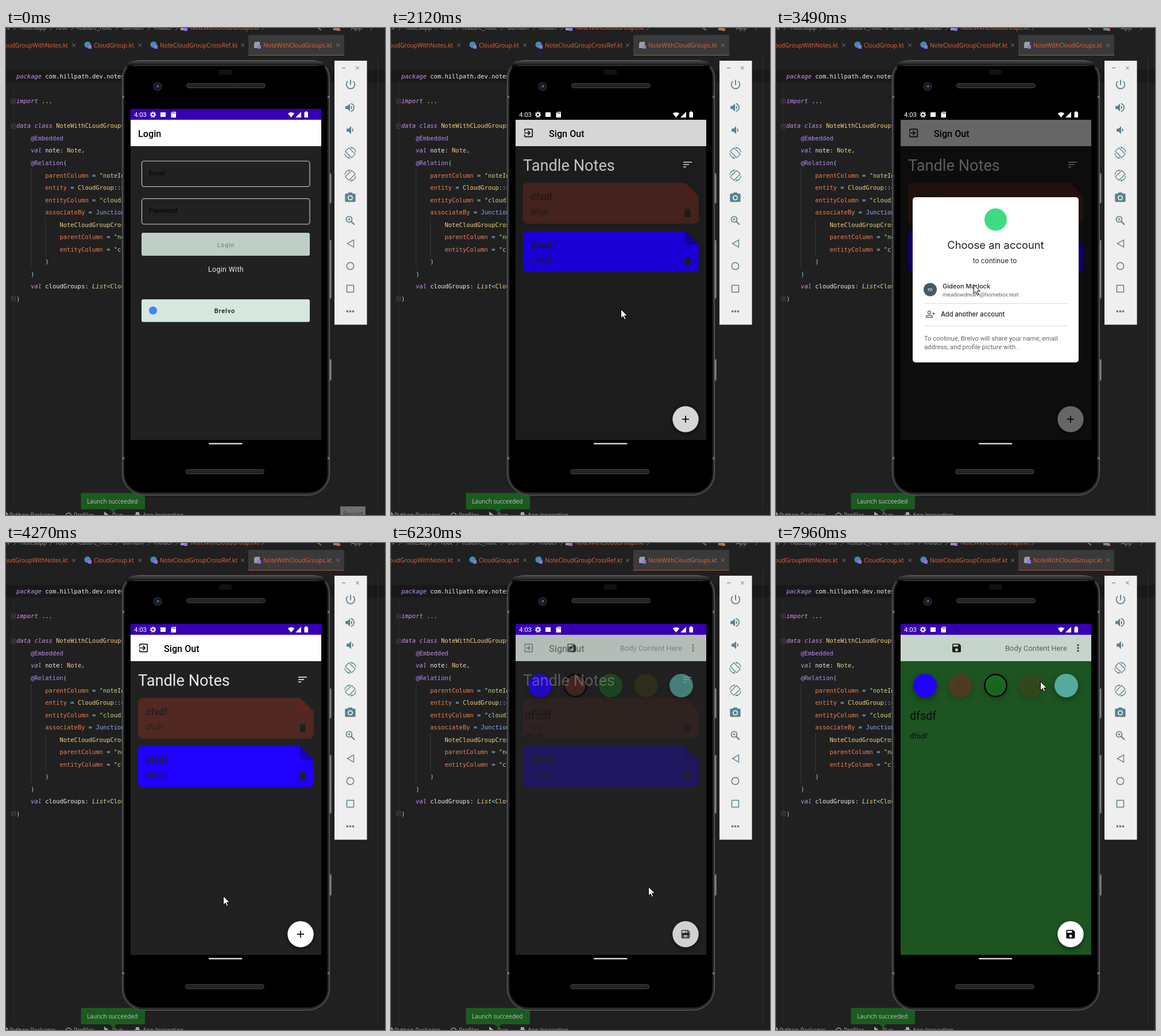
An HTML page with a canvas that plays this animation: 660x849 px, repeating every 8000 ms.

```html
<!DOCTYPE html>
<html lang="en">
<head>
<meta charset="utf-8">
<title>Notes app demo</title>
<style>
html, body { margin: 0; width: 100%; height: 100%; overflow: hidden; background: #202020; }
canvas { display: block; width: 660px; height: 849px; }
</style>
</head>
<body>
<canvas id="stage" width="660" height="849"></canvas>
<script>
const LOOP = 8000, W = 660, H = 849;
const main = document.getElementById('stage').getContext('2d');
const layerCanvas = document.createElement('canvas');
layerCanvas.width = W;
layerCanvas.height = H;
const layer = layerCanvas.getContext('2d');
let g = main;

const UI = '10.25px "Open Sans", sans-serif';
const MONO = '10.45px "DejaVu Sans Mono", monospace';
const roboto = (size, weight = 400) => `${weight} ${size}px Roboto, sans-serif`;
const inter = (size, weight = 400) => `${weight} ${size}px Inter, sans-serif`;
const BG = '#212121', INK = '#202020', TEAL = '#5a8192';
const SCREEN = [217, 141, 332, 577];

const ICON = {
  save: 'M17 3H5a2 2 0 0 0-2 2v14a2 2 0 0 0 2 2h14a2 2 0 0 0 2-2V7zM12 19a3 3 0 1 1 0-6 3 3 0 0 1 0 6zM15 9H5V5h10z',
  trash: 'M6 19a2 2 0 0 0 2 2h8a2 2 0 0 0 2-2V7H6zM19 4h-3.5l-1-1h-5l-1 1H5v2h14z',
  exit: 'M10 15.6L11.5 17l5-5-5-5L10 8.4 12.7 11H3v2h9.7zM19 3H5a2 2 0 0 0-2 2v4h2V5h14v14H5v-4H3v4a2 2 0 0 0 2 2h14a2 2 0 0 0 2-2V5a2 2 0 0 0-2-2z',
  camera: 'M9 2L7.2 4H4a2 2 0 0 0-2 2v12a2 2 0 0 0 2 2h16a2 2 0 0 0 2-2V6a2 2 0 0 0-2-2h-3.2L15 2zM12 17a5 5 0 1 1 0-10 5 5 0 0 1 0 10zM12 15a3 3 0 1 0 0-6 3 3 0 0 0 0 6z',
  sound: 'M3 9v6h4l5 5V4L7 9zM16.5 12A4.5 4.5 0 0 0 14 8v8a4.5 4.5 0 0 0 2.5-4z',
  wave: 'M14 3.2v2.1a7 7 0 0 1 0 13.4v2.1a9 9 0 0 0 0-17.6z',
  power: 'M13 3h-2v10h2zM17.8 5.2l-1.4 1.4a7 7 0 1 1-8.8 0L6.2 5.2a9 9 0 1 0 11.6 0z',
  turn: 'M16.5 2.5A10.5 10.5 0 0 1 22.5 11H24A12 12 0 0 0 11.3 0l3.8 3.8zM10.2 1.7a1.5 1.5 0 0 0-2.1 0L1.7 8.1a1.5 1.5 0 0 0 0 2.1l12 12a1.5 1.5 0 0 0 2.1 0l6.4-6.4a1.5 1.5 0 0 0 0-2.1zM14.8 21.2l-12-12 6.4-6.4 12 12zM7.5 21.5A10.5 10.5 0 0 1 1.5 13H0A12 12 0 0 0 12.7 24l-3.8-3.8z',
  arrow: 'M0.5 0.5V16L4.1 12.6 6.6 18.3 9 17.2 6.5 11.7H11.5z'
};
for (const k in ICON) ICON[k] = new Path2D(ICON[k]);

const clamp = v => Math.max(0, Math.min(1, v));
const span = (t, a, b) => clamp((t - a) / (b - a));
const smooth = u => u * u * (3 - 2 * u);

// cubic-bezier(.4, 0, .2, 1)
function ease(x) {
  let lo = 0, hi = 1, s = x;
  for (let i = 0; i < 24; i++) {
    s = (lo + hi) / 2;
    const at = 1.2 * s * (1 - s) ** 2 + 0.6 * s * s * (1 - s) + s ** 3;
    if (at < x) lo = s; else hi = s;
  }
  return 3 * s * s * (1 - s) + s ** 3;
}

function text(s, x, y, font, color, align = 'left', spacing = 0) {
  g.font = font;
  g.fillStyle = color;
  g.textAlign = align;
  g.letterSpacing = spacing + 'px';
  g.fillText(s, x, y);
}
function rect(x, y, w, h, color, r = 0) {
  g.fillStyle = color;
  g.beginPath();
  g.roundRect(x, y, w, h, r);
  g.fill();
}
function frame(x, y, w, h, color, r = 0, lw = 1) {
  g.strokeStyle = color;
  g.lineWidth = lw;
  g.beginPath();
  g.roundRect(x, y, w, h, r);
  g.stroke();
}
function disc(x, y, r, color) {
  g.fillStyle = color;
  g.beginPath();
  g.arc(x, y, r, 0, 7);
  g.fill();
}
function ring(x, y, r, color, lw) {
  g.strokeStyle = color;
  g.lineWidth = lw;
  g.beginPath();
  g.arc(x, y, r, 0, 7);
  g.stroke();
}
function poly(points, color, lw = 0, close = false) {
  g.beginPath();
  for (let i = 0; i < points.length; i += 2) g.lineTo(points[i], points[i + 1]);
  if (close || !lw) g.closePath();
  if (lw) {
    g.strokeStyle = color;
    g.lineWidth = lw;
    g.stroke();
  } else {
    g.fillStyle = color;
    g.fill();
  }
}
function icon(path, cx, cy, size, color, flip = 1) {
  g.save();
  g.translate(cx, cy);
  g.scale(flip * size / 24, size / 24);
  g.translate(-12, -12);
  g.fillStyle = color;
  g.fill(path, 'evenodd');
  g.restore();
}
function cross(x, y, r, color, lw = 1) {
  poly([x - r, y - r, x + r, y + r], color, lw);
  poly([x - r, y + r, x + r, y - r], color, lw);
}
function shadow(blur, dy, alpha) {
  g.shadowColor = `rgba(0,0,0,${alpha})`;
  g.shadowBlur = blur;
  g.shadowOffsetY = dy;
}

// Code colours: k keyword, a annotation, w plain, y type, o argument, s string, b call, c operator
const HUES = { k: '#c792ea', a: '#b58cf2', w: '#e8f0f0', y: '#f0cf84', o: '#ec8054', s: '#bddc8a', b: '#8fa6f4', c: '#89ddff' };
const CODE = [
  [0, 'k:package', 'w: com.hillpath.dev.notes'], [],
  [0, 'k:import', 'y: ...'], [],
  [0, 'k:data class', 'y: NoteWithCLoudGroups('],
  [4, 'a:@Embedded'],
  [4, 'k:val', 'w: note', 'c:: ', 'y:Note', 'c:,'],
  [4, 'a:@Relation', 'c:('],
  [8, 'o:parentColumn ', 'c:= ', 's:"noteId"'],
  [8, 'o:entity ', 'c:= ', 'y:CloudGroup', 'c:::class'],
  [8, 'o:entityColumn ', 'c:= ', 's:"cloudId"'],
  [8, 'o:associateBy ', 'c:= ', 'b:Junction('],
  [12, 'y:NoteCloudGroupCrossRef'],
  [12, 'o:parentColumn ', 'c:= ', 's:"noteId"'],
  [12, 'o:entityColumn ', 'c:= ', 's:"cloudId"'],
  [8, 'c:)'], [4, 'c:)'],
  [4, 'k:val', 'w: cloudGroups', 'c:: ', 'i:List', 'c:<', 'y:CloudGroup'],
  [0, 'c:)']
];

function code() {
  rect(0, 73, W, 22, '#191919');
  rect(647, 48, 1, 790, '#303030');
  rect(13, 95, 1, 742, '#2b2b2b');
  rect(43, 246, 1, 172, '#373737');
  rect(68, 332, 1, 66, '#373737');
  CODE.forEach((line, row) => {
    let col = line[0];
    for (const part of line.slice(1)) {
      const kind = part[0], s = part.slice(2), it = kind === 'k' || kind === 'i';
      text(s, 18 + col * 6.29, 88.3 + row * 21.53, (it ? 'italic ' : '') + MONO, HUES[kind] || HUES.y);
      col += s.length;
    }
  });
  for (const y of [127.5, 171, 472]) {
    rect(9, y - 4, 8, 8, BG);
    frame(9.5, y - 3.5, 7, 7, '#484848');
    rect(11, y - 0.5, 4, 1, '#666');
  }
}

function ktIcon(x, y, file) {
  if (file) poly([x - 4, y - 6, x + 4, y - 6, x + 4, y + 5, x - 6, y + 5, x - 6, y - 3], '#93a0a8');
  else disc(x - 1, y - 1, 5.6, '#3f8db0');
  rect(x, y, 6, 6, '#a06be8');
}

function editorTop() {
  const grey = '#9a9a9a', orange = '#e0663f';
  [['ev', -4], ['notesapp', 26], ['root', 87], ['feature_note', 124], ['domain', 203], ['model', 258], ['App', 601]]
    .forEach(([s, x]) => text(s, x, 3, UI, grey));
  text('NoteWithCloudGroups.kt', 321, 3, UI, orange);
  for (const x of [15, 78, 115, 193, 249, 297, 447, 636]) poly([x - 2, -4, x + 2, 0, x - 2, 4], '#777', 1);
  ktIcon(310, -1, true);
  poly([541, -2, 549, 4], '#777', 2);
  rect(570, -4, 10, 8, '#678b9c');
  rect(576, 1, 6, 4, '#d96536');

  rect(422, 12, 167, 36, '#3a3a3a');
  rect(422, 47, 167, 1, '#b4573a');
  [['CloudGroupWithNotes.kt', -12, 118], ['CloudGroup.kt', 153, 233], ['NoteCloudGroupCrossRef.kt', 268, 412], ['NoteWithCloudGroups.kt', 448, 578]]
    .forEach(([s, x, close], i) => {
      text(s, x, 34, UI, orange);
      cross(close, 30, 3, '#7b7b7b');
      if (i) ktIcon(x - 10, 30, i === 3);
    });
}

function editorBottom(t) {
  const c = '#a3a3a3';
  disc(-1, 849, 5, '#7d8b93');
  [['Python Packages', 6], ['Profiler', 118], ['Run', 185], ['App Inspection', 238]]
    .forEach(([s, x]) => text(s, x, 852.5, UI, c));
  ring(109, 850, 4.5, c, 1.5);
  poly([171, 843, 179, 849, 171, 855], c);
  rect(226, 844, 6, 4, c);
  rect(224, 848, 10, 3, c);
  poly([179, 838, 193, 838, 187, 845], '#1c5b20');
  rect(130.5, 810.5, 111.5, 28.5, '#1c5b20', 2);
  text('Launch succeeded', 141, 828.5, UI, '#b9c5b8');
  if (t < 70) {
    rect(582, 834, 44, 16, '#707070');
    text('Record', 587, 850.5, '10.6px "Open Sans", sans-serif', '#343434');
  }
}

function phone() {
  for (const [y, h] of [[253, 53], [369, 103], [577, 38]]) {
    rect(561, y, 6, h, '#5e6060', 2);
    rect(564, y + 2, 1.5, h - 4, '#8a8c8c');
  }
  rect(202, 56, 362, 759, '#2b2d2d', [30, 30, 38, 38]);
  frame(202.5, 56.5, 361, 758, '#66696a', [30, 30, 38, 38]);
  rect(206, 60, 354, 750, '#000', [26, 26, 33, 33]);
  for (const y of [118, 748]) {
    rect(202, y, 4, 4, '#696c6c');
    rect(560, y, 4, 4, '#696c6c');
  }
  const gloss = g.createLinearGradient(0, 57, 0, 68);
  gloss.addColorStop(0, '#4a4d4c');
  gloss.addColorStop(0.7, '#161818');
  gloss.addColorStop(1, '#000');
  rect(210, 57.5, 346, 11, gloss, [24, 24, 0, 0]);
  poly([222, 65.5, 544, 65.5], '#39423e', 1);
  rect(370, 72, 24, 9.5, '#111214', 5);
  for (const [x, y] of [[314, 96], [312, 769]]) {
    rect(x, y, 138, 9, '#333', 4.5);
    rect(x + 2, y + 2, 134, 5, '#1b1b1b', 2.5);
    for (let i = 5; i < 134; i += 3) rect(x + i, y + 3, 1, 3, '#3b3b3b');
  }
  disc(264, 102, 7.8, '#23272b');
  disc(264, 102, 5.5, '#12161c');
  disc(264, 102, 3, '#27365d');
  disc(265, 101, 1.2, '#6c83b8');
  rect(353, 723.5, 58.5, 2.2, '#ededed', 1);
}

function statusBar(color) {
  rect(217, 141, 332, 19, color);
  text('4:03', 223, 155, roboto(11.4), '#fff');
  g.setLineDash([1.9, 1.9]);
  ring(256, 151, 4.4, '#fff', 1.8);
  g.setLineDash([]);
  ring(256, 151, 2.8, '#fff', 1.9);
  rect(269, 147, 9, 8, '#fff');
  poly([290, 146, 296, 146, 296, 156, 287.5, 156, 287.5, 148.5], '#fff');
  for (let i = 0; i < 3; i++) rect(290 + i * 1.9, 147, 0.9, 2.4, color);
  g.beginPath();
  g.moveTo(496.5, 156);
  g.arc(496.5, 156, 9, -2.27, -0.87);
  g.fillStyle = '#fff';
  g.fill();
  poly([504, 156, 514, 146, 514, 156], '#fff');
  rect(519.5, 146.5, 6.5, 9.5, '#fff', 1);
  rect(521.3, 145.4, 3, 2, '#fff');
}

function toolbar(color) {
  rect(217, 160, 332, 46, color);
}

function loginScreen() {
  toolbar('#fff');
  text('Login', 230, 189.5, roboto(16.2, 500), '#000');
  [['Email', 232], ['Password', 297.5]].forEach(([s, y]) => {
    frame(236.5, y, 292.5, 44.5, '#d6d6d6', 4, 1.1);
    text(s, 249, y + 24.5, roboto(11.2), '#000');
  });
  rect(236, 357, 293, 40, '#bfcfc6', 3);
  text('Login', 383, 381.5, roboto(10.5, 500), '#7c8781', 'center', 0.9);
  text('Login With', 383, 425, roboto(12.4), '#ededed', 'center', 0.35);
  rect(236, 473, 293, 39.5, '#d6e7dd', 3);
  text('Brelvo', 381, 497, roboto(11, 500), '#111', 'center', 0.9);
  disc(256, 492.5, 7, '#4285f4');
}

function note(y, color, fold, body) {
  const left = 229.8, right = 535.8, bottom = y + 71.2, cut = 24;
  g.beginPath();
  g.moveTo(right - cut, y);
  g.lineTo(right, y + cut);
  g.arcTo(right, bottom, left, bottom, 8);
  g.arcTo(left, bottom, left, y, 8);
  g.arcTo(left, y, right, y, 8);
  g.closePath();
  g.fillStyle = color;
  g.fill();
  g.beginPath();
  g.moveTo(right - cut, y);
  g.lineTo(right, y + cut);
  g.arcTo(right - cut, y + cut, right - cut, y, 8);
  g.closePath();
  g.fillStyle = fold;
  g.fill();
  text('dfsdf', 243, y + 30, roboto(16.2, 500), INK);
  text(body, 243, y + 55, roboto(12.9), INK);
  icon(ICON.trash, 516.5, y + 52.5, 19.5, INK);
}

function fab() {
  g.save();
  shadow(7, 3, 0.5);
  disc(513, 682, 22.7, '#fff');
  g.restore();
}

function notesScreen() {
  toolbar('#fff');
  icon(ICON.exit, 239.5, 183, 20, '#111');
  text('Sign Out', 275, 189.5, roboto(16.2, 500), '#000');
  text('Tandle Notes', 230, 248.5, roboto(27.2), '#e8e8e8');
  [15, 10, 5].forEach((w, i) => rect(509, 233 + i * 4.2, w, 1.7, '#e8e8e8'));
  note(270, '#512822', '#5f241b', 'dfsdf');
  note(354, '#2000ff', '#1a00b8', 'sdfsdf');
  fab();
  rect(507, 681.1, 12, 1.7, '#000');
  rect(512.1, 676, 1.7, 12, '#000');
}

const SWATCH = ['rgb(32,0,255)', 'rgba(128,48,36,.5)', 'rgba(26,136,36,.5)', 'rgba(76,72,24,.5)', 'rgba(101,199,191,.8)'];

function editScreen(t) {
  const picked = t < 7030 ? 1 : 2;
  const tint = ease(span(t, 7030, 7530));
  if (tint) {
    g.globalAlpha = tint;
    rect(217, 206, 332, 512, '#1d5422');
    g.globalAlpha = 1;
  }
  toolbar('#c6d5cc');
  icon(ICON.save, 314.5, 183, 20, '#1c1f1d');
  text('Body Content Here', 399, 188, roboto(12.93), '#59615d');
  for (const y of [178, 183, 188]) disc(526, y, 1.7, '#3f4542');
  SWATCH.forEach((c, i) => {
    const x = 259.5 + i * 61.5;
    g.save();
    shadow(12, 4, 0.4);
    disc(x, 248.5, 20.5, c);
    g.restore();
    if (i === picked) ring(x, 248.5, 19.2, '#000', 2.5);
  });
  text('dfsdf', 233, 308, roboto(19.7), '#0b0b0b');
  text('dfsdf', 233, 340.5, roboto(13.2), '#0b0b0b');
  fab();
  icon(ICON.save, 513, 682, 20, '#000');
}

// Draws a whole screen as one translucent group
function group(alpha, draw) {
  if (alpha <= 0) return;
  layer.clearRect(0, 0, W, H);
  g = layer;
  draw();
  g = main;
  g.globalAlpha = alpha;
  g.drawImage(layerCanvas, 0, 0);
  g.globalAlpha = 1;
}

function dialog() {
  const dark = '#202124', soft = '#5f6368';
  rect(238, 295, 289, 288, '#fff', 5);
  disc(382.5, 334, 19.5, '#3ddc84');
  text('Choose an account', 382.5, 385, inter(18.4), dark, 'center');
  text('to continue to', 381, 410, inter(11.8), dark, 'center');
  disc(268.5, 456, 11.5, '#455a64');
  text('m', 268.5, 459, roboto(9.5), '#fff', 'center');
  text('Gideon Marlock', 290, 454, inter(11, 500), dark);
  text('meadowdream@homebox.test', 290, 467.5, roboto(9.7), soft);
  rect(258, 480, 250, 1, '#dadce0');
  rect(258, 519, 250, 1, '#dadce0');
  ring(267, 496, 2.6, soft, 1.3);
  g.beginPath();
  g.moveTo(261.5, 504.5);
  g.bezierCurveTo(261.5, 499.5, 272.5, 499.5, 272.5, 504.5);
  g.closePath();
  g.stroke();
  rect(272, 497.4, 5, 1.2, soft);
  rect(273.9, 495.5, 1.2, 5, soft);
  text('Add another account', 287, 503, inter(11.1, 500), dark);
  text('To continue, Brelvo will share your name, email', 258, 545, roboto(11.26), soft);
  text('address, and profile picture with .', 258, 559.5, roboto(11.26), soft);
}

// The leaving screen fades out above the entering one
function screen(t) {
  const toNotes = ease(span(t, 1180, 1880));
  const toEdit = ease(span(t, 5912, 6612));
  const dim = 0.6 * smooth(span(t, 2050, 2260)) * (1 - smooth(span(t, 3580, 3820)));
  g.save();
  g.beginPath();
  g.rect(...SCREEN);
  g.clip();
  rect(...SCREEN, BG);
  group(toEdit, () => editScreen(t));
  group(toNotes * (1 - toEdit), notesScreen);
  group(1 - toNotes, loginScreen);
  if (dim > 0) rect(...SCREEN, `rgba(0,0,0,${dim})`);
  statusBar(t >= 2050 && t < 3820 ? '#000' : '#3700b3');
  group(smooth(span(t, 2500, 2680)) * (1 - span(t, 3530, 3640)), dialog);
  g.restore();
}

function sidePanel() {
  rect(572, 57, 56.6, 460.2, '#efefef');
  rect(585, 69, 6, 1, '#666');
  cross(612, 69.5, 2.8, '#666');
  icon(ICON.power, 600, 98.5, 22, TEAL);
  icon(ICON.sound, 599, 138.5, 21, TEAL);
  icon(ICON.wave, 599, 138.5, 21, TEAL);
  icon(ICON.sound, 601, 178, 21, TEAL);
  icon(ICON.turn, 599.5, 217.5, 20.5, TEAL);
  icon(ICON.turn, 599.5, 257, 20.5, TEAL, -1);
  icon(ICON.camera, 599.5, 296, 22, TEAL);
  ring(597.5, 333.5, 5, TEAL, 1.7);
  poly([601, 337, 607, 343], TEAL, 2.2);
  rect(595, 333, 5, 1.1, TEAL);
  rect(597, 331, 1.1, 5, TEAL);
  poly([605.5, 369.5, 605.5, 382, 594.5, 375.8], TEAL, 1.4, true);
  ring(599.5, 415, 6.2, TEAL, 1.5);
  frame(593.5, 448.5, 12, 12, TEAL, 0.5, 1.5);
  for (const x of [594.5, 599.5, 604.5]) disc(x, 494, 1.9, TEAL);
}

// Pointer path: time, x, y
const PATH = [
  [70, 600, 838], [480, 445, 397], [820, 398, 516], [1010, 400, 490], [2600, 400, 490], [3280, 344, 447],
  [3520, 344, 447], [4130, 390, 649], [4270, 378, 615], [4480, 378, 615], [5010, 424, 316], [5780, 424, 316],
  [6230, 448, 599], [6580, 433, 244], [6920, 396, 243], [7030, 396, 243], [7450, 544, 710], [7820, 497, 494],
  [7960, 460, 241], [8000, 460, 241]
];

function pointer(t) {
  if (t < 70) return;
  const i = PATH.findIndex(p => p[0] > t);
  const [t0, x0, y0] = PATH[i - 1], [t1, x1, y1] = PATH[i];
  const u = smooth(span(t, t0, t1));
  g.save();
  g.translate(Math.round(x0 + (x1 - x0) * u), Math.round(y0 + (y1 - y0) * u));
  g.fillStyle = '#fff';
  g.fill(ICON.arrow);
  g.strokeStyle = '#000';
  g.lineWidth = 1;
  g.stroke(ICON.arrow);
  g.restore();
}

function draw(t) {
  g = main;
  rect(0, 0, W, H, '#202020');
  code();
  editorTop();
  editorBottom(t);
  phone();
  screen(t);
  sidePanel();
  pointer(t);
}

const start = performance.now();
function tick() {
  draw((performance.now() - start) % LOOP);
  requestAnimationFrame(tick);
}
tick();
</script>
</body>
</html>
```
